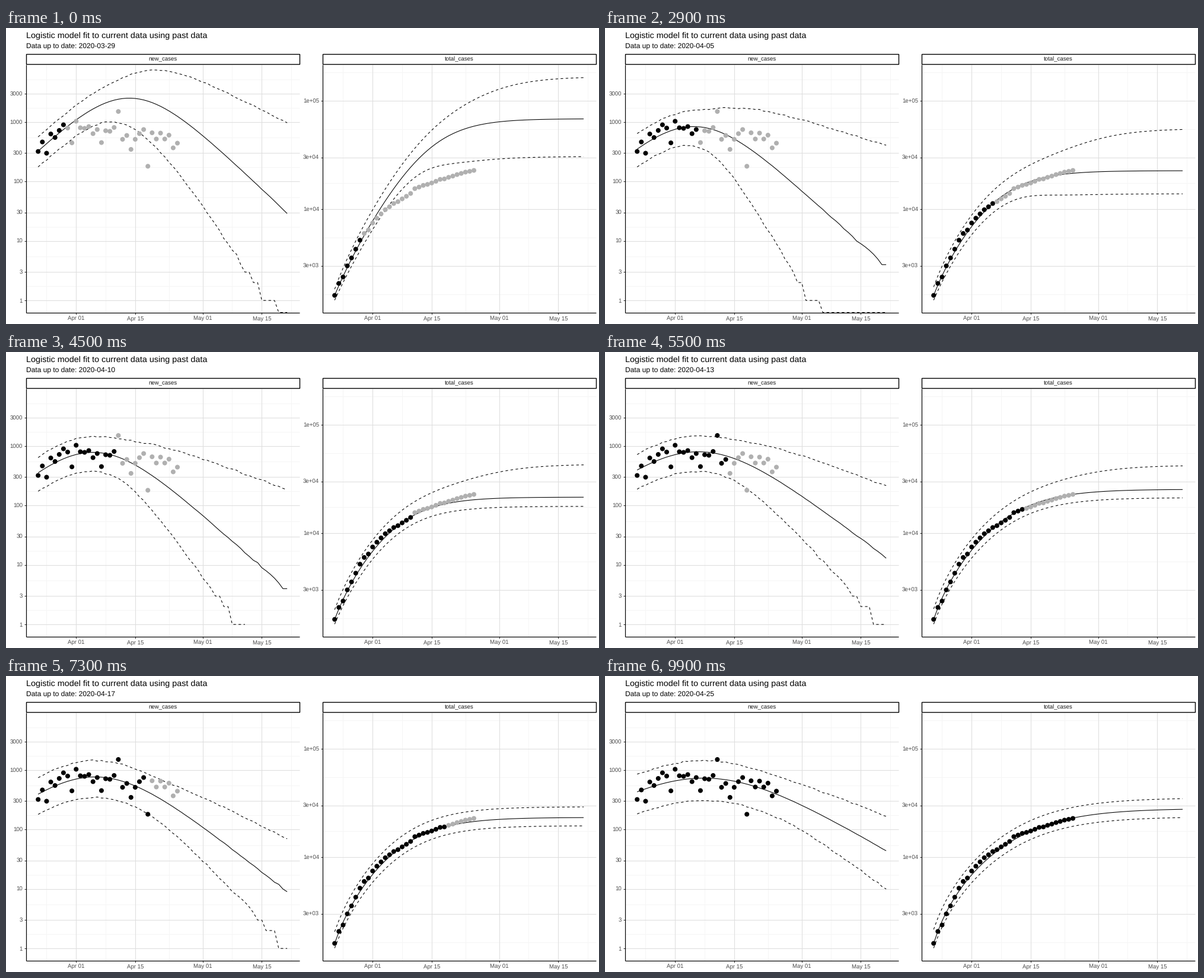
A matplotlib script for the animation above (10000 ms loop, 1000 by 500 pixels).

```python
import numpy as np
import matplotlib.pyplot as plt
from matplotlib.animation import FuncAnimation
from matplotlib.patches import Rectangle

plt.rcParams["font.family"] = "Liberation Sans"
plt.rcParams["text.hinting"] = "none"
PX = 0.72                      # points per pixel at 100 dpi
TOP, BOTTOM, WIDTH = 61, 480, 461
LEFT, RIGHT = 33, 533          # left edges of the two panels
DAYS = np.arange(60)
X = 53.7 + 7.117 * DAYS        # day 0 is 23 March
START = 1600                   # total cases on day 0

# Observed new cases per day
COUNTS = np.array([
    321, 464, 300, 632, 551, 725, 902, 795, 448, 1035, 804, 786, 842, 640,
    751, 453, 717, 701, 813, 1511, 514, 597, 348, 514, 640, 751, 181, 662,
    520, 654, 520, 604, 369, 443])

# Key fits: days added, peak height, peak day, rate,
# and how fast the upper and lower band widen per day
FITS = np.array([
    [0, 118, 21.6, .156, 3.05, 4.2],
    [3.5, 150, 19, .132, 2.5, 5.5],
    [7.5, 166, 13.4, .150, 4.3, 6],
    [12, 169, 13, .146, 3.65, 3.8],
    [15, 168, 14.5, .123, 2.6, 2.45],
    [19.5, 170, 13.5, .128, 1.95, 1.9],
    [27, 172, 15.8, .0965, 1.2, 1.1]])


def new_y(v):
    return 459.7 - 100.4 * np.log10(v)


def new_val(y):
    return 10 ** ((459.7 - y) / 100.4)


def tot_y(v):
    return 305.5 - 183 * (np.log10(v) - 4)


def sigmoid(x):
    return 1 / (1 + np.exp(-x))


def whole(y, keep_zero):
    """Round counts; zeros sit on the panel floor or drop out."""
    n = np.rint(new_val(y))
    return np.where(n > 0, new_y(np.maximum(n, 1)),
                    BOTTOM if keep_zero else np.nan)


def curves(pos, keep_zero):
    peak, mid, rate, up, down = [np.interp(pos, FITS[:, 0], col)
                                 for col in FITS.T[1:]]
    # New cases: logistic growth, bands widen once the data run out
    fit = peak + 200.8 * np.log10(np.cosh(rate * (DAYS - mid) / 2))
    ahead = 2.5 * np.log1p(np.exp((DAYS - max(17, pos + 8)) / 2.5))
    rng = np.random.default_rng(int(pos * 2))
    hi = fit - (24 + 0.2 * pos + up * ahead) + rng.normal(0, 0.6, 60)
    lo = fit + (27 + 0.4 * pos + down * ahead) + rng.normal(0, 0.6, 60)

    # Total cases: the running sum, bands open towards the plateau
    s = sigmoid(rate * (DAYS - mid))
    total = tot_y(START + 4.25 * new_val(peak) / rate * (s - s[0]))
    fade = np.exp(-DAYS / 4)
    open_hi = np.clip(5 * (19.5 - pos), 0, 53) * sigmoid((DAYS - 33) / 7)
    open_lo = 50 * sigmoid((7.5 - pos) / 1.3) * sigmoid((DAYS - 24) / 4)
    tot_hi = total - (18 + (pos / 2 - 8) * fade + open_hi)
    tot_lo = total + (14 - 6 * fade + open_lo)
    return [whole(y, keep_zero) for y in (fit, hi, lo)] + [total, tot_hi, tot_lo]


def position(f):
    """Days added so far; a half marks the blend between two fits."""
    k = (3 * f + 1) // 11
    starts_now = k > 0 and (11 * k + 1) // 3 == f
    blended = k <= 12 or k % 3 == 2
    return k - 0.5 if starts_now and blended else k


fig = plt.figure(figsize=(10, 5), dpi=100, facecolor="white")
ax = fig.add_axes([0, 0, 1, 1])
ax.set_xlim(-0.5, 999.5)
ax.set_ylim(499.5, -0.5)
ax.axis("off")


def text(x, y, s, size, color="black", ha="left"):
    return ax.text(x, y, s, fontsize=size * PX, color=color, ha=ha,
                   va="baseline", zorder=7)


def rule(x, y, color, width=1.07, z=1):
    ax.plot(x, y, color=color, lw=width * PX, zorder=z,
            solid_capstyle="butt")


def panel(x0, name, ticks, top_minor, low_minor):
    x1 = x0 + WIDTH
    shift = x0 - LEFT
    for x in (67.7, 167.4, 274.1, 380.9, 480.5):
        rule([x + shift] * 2, [TOP, BOTTOM], "#f5f5f5", 1)
    ys = [y for y, _ in ticks]
    between = [(a + b) / 2 for a, b in zip(ys, ys[1:])]
    for y in between + [top_minor, low_minor]:
        if y < BOTTOM:
            rule([x0, x1], [y, y], "#f5f5f5", 1)
    for day, label in ((9, "Apr 01"), (23, "Apr 15"),
                       (39, "May 01"), (53, "May 15")):
        x = X[day] + shift
        rule([x, x], [TOP, BOTTOM], "#dfdfdf", z=2)
        rule([x, x], [BOTTOM, BOTTOM + 3], "#333333", z=2)
        text(x, 493, label, 9.6, "#4d4d4d", "center")
    for y, label in ticks:
        rule([x0, x1], [y, y], "#dfdfdf", z=2)
        rule([x0 - 3, x0], [y, y], "#333333", z=2)
        text(x0 - 5.5, y + 3.5, label, 9.6, "#4d4d4d", "right")
    rule([x0, x0], [TOP, BOTTOM], "black", 1.2, 6)
    rule([x0, x1], [BOTTOM, BOTTOM], "black", 1.2, 6)
    ax.add_patch(Rectangle((x0, 43), WIDTH, 17, fc="white", ec="black",
                           lw=1.4 * PX, zorder=6))
    text(x0 + WIDTH / 2, 55, name, 9.6, "#1a1a1a", "center")


panel(LEFT, "new_cases",
      [(new_y(v), str(v)) for v in (1, 3, 10, 30, 100, 300, 1000, 3000)],
      86, BOTTOM)
panel(RIGHT, "total_cases",
      [(tot_y(v), f"{v:.0e}") for v in (3e3, 1e4, 3e4, 1e5)], 74.6, 449.5)
text(33, 17, "Logistic model fit to current data using past data", 14.4)
subtitle = text(33, 34, "", 12)

lines = []
for x0 in (LEFT, RIGHT):
    clip = Rectangle((x0, TOP), WIDTH, BOTTOM - TOP, transform=ax.transData)
    for style in ("-", (0, (4, 4)), (0, (4, 4))):
        line, = ax.plot([], [], color="black", lw=1.07 * PX, ls=style,
                        zorder=3, dash_capstyle="butt",
                        solid_capstyle="butt")
        line.set_clip_path(clip)
        lines.append(line)

n_obs = len(COUNTS)
totals = START + np.cumsum(COUNTS) - COUNTS[0]
dots = ax.scatter(np.concatenate([X[:n_obs], X[:n_obs] + 500]),
                  np.concatenate([new_y(COUNTS), tot_y(totals)]),
                  s=(8 * PX) ** 2, lw=0, zorder=4)


def draw(f):
    pos = position(f)
    keep_zero = f == 0 or pos % 1 > 0
    for i, (line, y) in enumerate(zip(lines, curves(pos, keep_zero))):
        line.set_data(X + (500 if i > 2 else 0), y)
    known = 7 + int(np.ceil(pos))
    dots.set_facecolors((["black"] * known
                         + ["#b0b0b0"] * (n_obs - known)) * 2)
    day = 29 + max(0, min(27, int((f - 0.45) / 3.63)))
    month, day = (3, day) if day <= 31 else (4, day - 31)
    subtitle.set_text(f"Data up to date: 2020-{month:02d}-{day:02d}")
    return lines + [dots, subtitle]


anim = FuncAnimation(fig, draw, frames=100, interval=100,
                     init_func=lambda: draw(0), repeat=True, blit=False)
plt.show()
```
